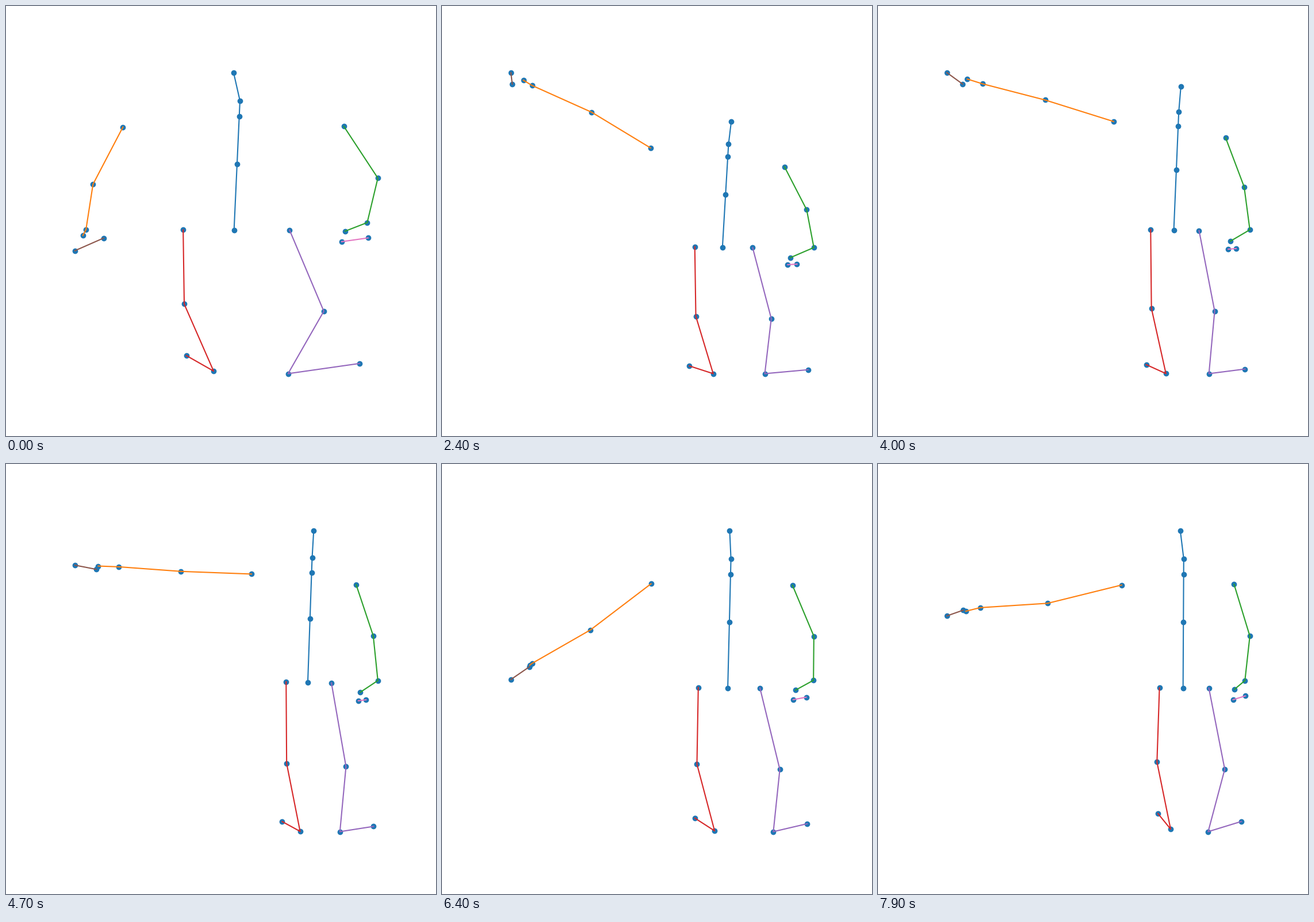
These frames come from a looping animation (748 by 748 pixels, 8000 ms). A matplotlib script:

```python
import numpy as np
import matplotlib.pyplot as plt
from matplotlib.animation import FuncAnimation

FRAMES, STEP = 80, 100

# Times in ms and what drives the pose at each of them.
TIMES = np.array([0, 1400, 3300, 4700, 5700, 7000, 7900])
SWING = [-80, 53, 38, 2.6, -26, -65.5, -18.8]       # raised arm, degrees
BEND = [-7, -9, -7.5, 2.5, 12.5, 4.5, 13.7]         # its elbow, degrees
REACH = [0.15, 0.13, 0.15, 0.242, 0.155, 0.136, 0.178]   # wrist to finger tip
GRIP = [0.042, 0.056, 0.056, 0.113, 0.017, 0.015, 0.077]  # wrist to hand
TALL = [1.1, 0.99, 0.99, 1.015, 1.106, 1.075, 1.1]  # height of the head
SWAY = [0, 1, 1, 0.9, 0, 0.75, 0]                   # loose to braced stance
DRIVE = np.column_stack([SWING, BEND, REACH, GRIP, TALL, SWAY])


def glide(t):
    """Monotone cubic through the driving values."""
    h = np.diff(TIMES)[:, None]
    d = np.diff(DRIVE, axis=0) / h
    a, b = d[:-1], d[1:]
    same = a * b > 0
    mid = np.where(same, 2 * a * b / np.where(same, a + b, 1), 0)
    m = np.vstack([d[:1], mid, d[-1:]])
    k = min(np.searchsorted(TIMES, t, side="right") - 1, len(h) - 1)
    u = (t - TIMES[k]) / h[k]
    return ((1 + 2 * u) * (1 - u) ** 2 * DRIVE[k]
            + u * (1 - u) ** 2 * h[k] * m[k]
            + u * u * (3 - 2 * u) * DRIVE[k + 1]
            + u * u * (u - 1) * h[k] * m[k + 1])


def heading(degrees):
    """Unit step to the left, raised by an angle."""
    return -np.exp(-1j * np.radians(degrees))


def pose(t):
    """Limbs as complex points; the hip centre is 0 and a leg is 1 long."""
    swing, bend, reach, grip, tall, sway = glide(t)
    turn = max(0, 1 - t / 1400)
    kick = max(0, 1 - abs(t - 7000) / 700)

    def at(x, y, dx=0, dy=0):
        return complex(x + dx * sway, y + dy * sway)

    lean = 0.004 + 0.028 * sway + 0.013 * turn
    spine = np.array([0, 0.42, 0.723, 0.822, 1]) * complex(lean, tall)
    spine[-1] += 0.024 * sway - 0.018

    upper, fore = heading(swing), heading(swing + bend)
    shoulder = complex(0.05 * turn - 0.311, 0.721 + 0.085 * max(0, upper.imag))
    elbow = shoulder + upper * (0.39 - 0.015 * upper.imag)
    wrist = elbow + fore * (0.31 - 0.035 * upper.real)
    right_arm = [shoulder, elbow, wrist, wrist + upper * grip]
    thumb = wrist + upper * (grip + 0.01 + 1j * (0.03 - 0.003 * bend))
    right_fingers = [wrist + upper * reach, thumb]

    shoulder = at(0.258, 0.66 * tall, 0.01, -0.018)
    elbow = shoulder + at(0.08, -0.361, 0.016, 0.021)
    wrist = elbow + at(-0.025, -0.31, 0.056, 0.012)
    left_arm = [shoulder, elbow, wrist, wrist + at(-0.052, -0.06, -0.05, -0.02)]
    left_fingers = [wrist + at(-0.06, -0.133, -0.053, -0.002),
                    wrist + at(0.002, -0.107, -0.075, -0.024)]

    shift = 0.015 * turn
    right_leg = [at(-0.1195, 0.004),
                 at(-0.132, -0.513, 0.017, -0.032) + shift,
                 at(-0.063, -0.98, 0.023, -0.018) + shift,
                 at(-0.127, -0.872, -0.016, -0.065) + shift]
    left_leg = [at(0.1305, 0.003, 0, -0.007),
                at(0.211, -0.563),
                at(0.127, -0.998, 0.056) + kick * (0.24 + 0.034j),
                at(0.295, -0.927, 0.075, -0.04) + kick * (0.038j - 0.029)]
    return [spine, right_arm, left_arm, right_leg, left_leg,
            right_fingers, left_fingers]


fig, ax = plt.subplots(figsize=(7.48, 7.48), dpi=100)
fig.subplots_adjust(left=0.125, right=0.9, bottom=0.11, top=0.88)
ax.axis("off")
dots = ax.scatter([], [], color="C0")
lines = [ax.plot([], [], color=f"C{i}")[0] for i in range(7)]


def padded(v):
    pad = 0.05 * np.ptp(v)
    return v.min() - pad, v.max() + pad


def update(i):
    limbs = pose(i * STEP)
    for line, limb in zip(lines, limbs):
        line.set_data(np.real(limb), np.imag(limb))
    z = np.concatenate(limbs)
    dots.set_offsets(np.column_stack([z.real, z.imag]))
    ax.set_xlim(*padded(z.real))
    ax.set_ylim(*padded(z.imag))
    return [dots, *lines]


anim = FuncAnimation(fig, update, frames=FRAMES, interval=STEP, repeat=True,
                     repeat_delay=0, blit=False)
plt.show()
```
